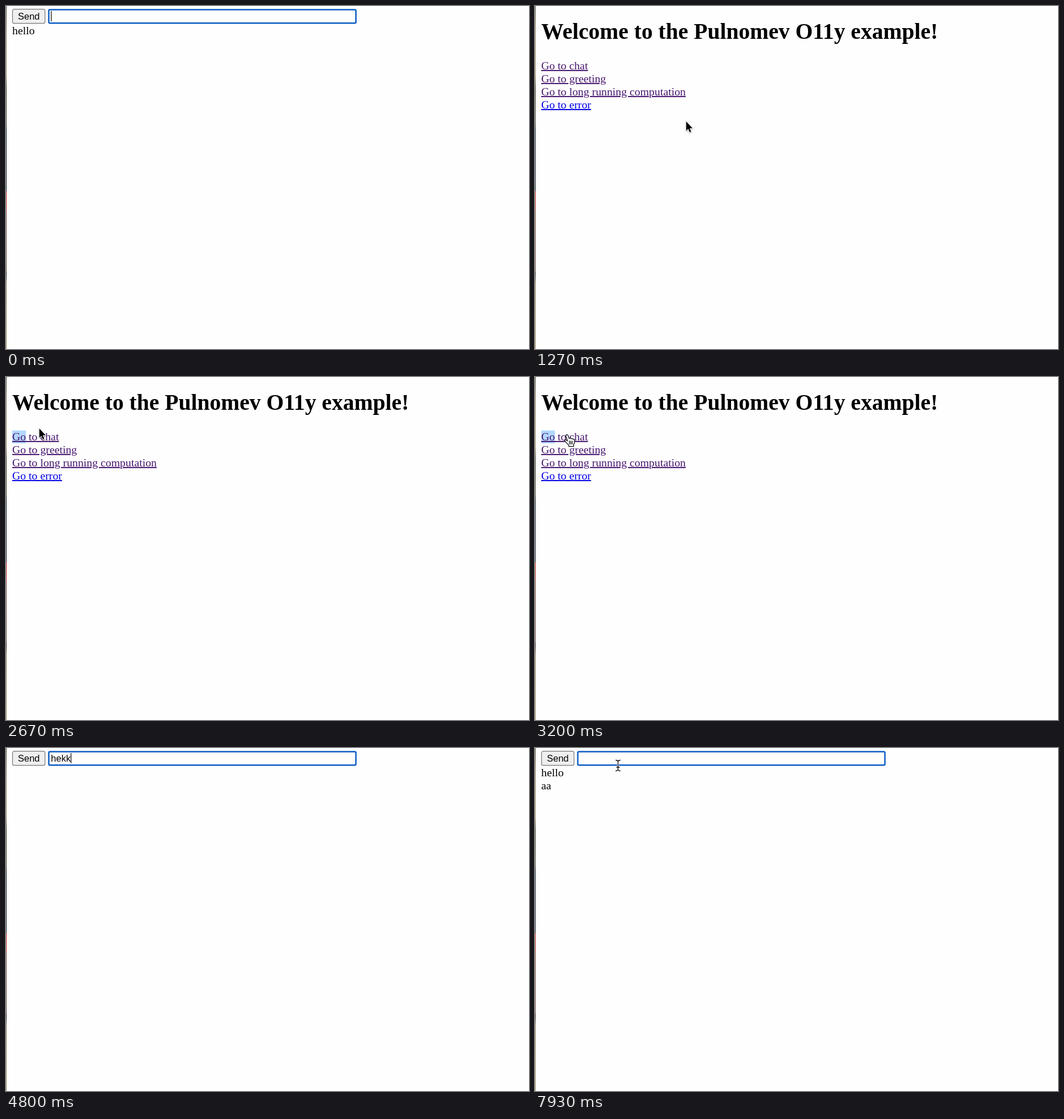
These frames come from a looping animation (923x606 px, 8 s). An HTML page:

```html
<!DOCTYPE html>
<html lang="en">
<head>
<meta charset="utf-8">
<title>Chat demo</title>
<style>
  html, body { margin: 0; width: 100%; height: 100%; overflow: hidden; background: #fefefe; }
  svg { display: block; }
  .serif { font: 19.8px "Liberation Serif", serif; }
  .serif .heading { font-size: 39.6px; font-weight: bold; }
  .sans { font: 16.5px "Liberation Sans", sans-serif; }
  .link { fill: #47176f; text-decoration: underline; }
  .fresh { fill: #0000e6; }
</style>
</head>
<body>
<svg width="923" height="606" viewBox="0 0 923 606">
  <defs>
    <linearGradient id="edge" x2="0" y2="1">
      <stop offset="0" stop-color="#4a4630"/>
      <stop offset=".07" stop-color="#8a7a50"/>
      <stop offset=".2" stop-color="#a08c58"/>
      <stop offset=".24" stop-color="#35351c"/>
      <stop offset=".34" stop-color="#4a4c2c"/>
      <stop offset=".36" stop-color="#0c1c24"/>
      <stop offset=".54" stop-color="#14202c"/>
      <stop offset=".54" stop-color="#c01c14"/>
      <stop offset=".59" stop-color="#a82c1c"/>
      <stop offset=".6" stop-color="#7a4630"/>
      <stop offset=".77" stop-color="#6a4838"/>
      <stop offset=".78" stop-color="#1c1824"/>
      <stop offset=".81" stop-color="#8a7448"/>
      <stop offset="1" stop-color="#9c8654"/>
    </linearGradient>
  </defs>
  <rect width="1" height="606" fill="url(#edge)"/>

  <g id="home" class="serif">
    <rect id="selection" x="11" y="94.5" width="24.2" height="22.7" fill="#b3d7ff"/>
    <text class="heading" x="11" y="58">Welcome to the Pulnomev O11y example!</text>
    <text class="link" x="11" y="112">Go to chat</text>
    <text class="link" x="11" y="135">Go to greeting</text>
    <text class="link" x="11" y="158">Go to long running computation</text>
    <text class="link fresh" x="11" y="181">Go to error</text>
  </g>

  <g id="chat">
    <g class="sans">
      <rect x="11.5" y="5.7" width="57.3" height="25" rx="3" fill="#efefef" stroke="#767676" stroke-width="1.2"/>
      <text x="21" y="23.6">Send</text>
      <rect x="75.5" y="6.4" width="542" height="23.8" rx="2" fill="#fff" stroke="#0b5cc4" stroke-width="2.5"/>
      <text id="draft" x="79.3" y="23.6"></text>
      <rect id="caret" y="9" width="1.2" height="18"/>
    </g>
    <g class="serif">
      <text id="first" x="11" y="50">hello</text>
      <text id="second" x="11" y="73">aa</text>
    </g>
  </g>

  <g id="pointer" stroke-linejoin="round" stroke-linecap="round">
    <path id="arrow" d="M.8 1V17.4L4.4 14 7 20 9.6 18.9 7 13H12Z" stroke="#fff" stroke-width="1.8" paint-order="stroke"
          style="filter:drop-shadow(0 1.2px 1px #0005)"/>
    <g id="hand" stroke="#000" stroke-width="1.2" fill="none">
      <path fill="#fff" d="M-3.5 1.8C-4-.4-.5-.8.3 1.2L2.2 6.6C3.3 5.5 5 6 5.4 7.1 6.6 6.2 8.2 6.7 8.6 7.9 10 7.2 11.6 8 11.8 9.6 12.3 13 11.6 15 10.2 17.6V20.6H1.6V18.6C-.4 16.5-2.4 14-5 11.6-6.6 10-4.6 8.2-2.8 9.4L-.7 11Z"/>
      <path d="M2.6 11l.3 5.6M5.2 11l.2 5.6M7.8 11v5.6"/>
    </g>
    <g id="beam" fill="none">
      <path id="beamShape" d="M-3.8-9.5Q-.8-9.5 0-7.5.8-9.5 3.8-9.5M-3.8 9.5Q-.8 9.5 0 7.5.8 9.5 3.8 9.5M0-7.5V7.5M-2.4 3H2.4" stroke="#fff" stroke-width="3"/>
      <use href="#beamShape"/>
      <path d="M-3.8-9.5Q-.8-9.5 0-7.5.8-9.5 3.8-9.5M-3.8 9.5Q-.8 9.5 0 7.5.8 9.5 3.8 9.5M0-7.5V7.5M-2.4 3H2.4" stroke="#000" stroke-width="1.3"/>
    </g>
  </g>
</svg>
<script>
const LOOP = 8000, HOME_FROM = 600, CHAT_FROM = 3270;
const $ = id => document.getElementById(id);
const show = (id, on) => $(id).style.display = on ? "" : "none";
const within = (t, spans) => spans.some(([from, to]) => t >= from && t < to);

// [start time, text in the input]
const drafts = [
  [0, ""], [4130, "h"], [4400, "he"], [4600, "hek"], [4800, "hekk"], [5130, "hek"],
  [5270, "he"], [5470, "hel"], [5600, "hell"], [5800, "hello"], [6070, ""],
  [7070, "a"], [7270, "aa"], [7600, ""]
];
const caretOn = [[0, 130], [CHAT_FROM, 3770], [4000, 6330], [6800, 7730]];

// [start, end, x0, y0, x1, y1]
const moves = [
  [1000, 1000, 266, 203, 266, 203],
  [1700, 2200, 266, 203, 58, 90],
  [2670, 3130, 58, 90, 58, 102],
  [3500, 3800, 58, 103, 206, 14],
  [7930, 7930, 146.5, 31, 146.5, 31]
];
const pointerOn = [[1000, 4130], [7930, LOOP]];
const ease = p => p * p * (3 - 2 * p);
const latest = (list, t) => list.filter(([start]) => start <= t).pop();

function drawPointer(t, home) {
  const visible = within(t, pointerOn);
  show("pointer", visible);
  if (!visible) return;
  const [start, end, x0, y0, x1, y1] = latest(moves, t);
  const p = end > start ? ease(Math.min(1, (t - start) / (end - start))) : 1;
  const x = x0 + (x1 - x0) * p, y = y0 + (y1 - y0) * p;
  const shape = home ? (y > 94 && y < 117 && x < 94 ? "hand" : "arrow") : y < 32 ? "beam" : "arrow";
  for (const id of ["arrow", "hand", "beam"]) show(id, id === shape);
  $("pointer").setAttribute("transform", `translate(${x} ${y})`);
}

function draw(t) {
  const home = t >= HOME_FROM && t < CHAT_FROM;
  show("home", home);
  show("chat", !home);
  show("selection", t >= 2670);
  show("first", t < HOME_FROM || t >= 6070);
  show("second", t >= 7600);
  $("draft").textContent = latest(drafts, t)[1];
  show("caret", within(t, caretOn));
  if (!home) $("caret").setAttribute("x", 79.3 + $("draft").getComputedTextLength());
  drawPointer(t, home);
}

const began = performance.now();
function tick() {
  draw((performance.now() - began) % LOOP);
  requestAnimationFrame(tick);
}
tick();
</script>
</body>
</html>
```
